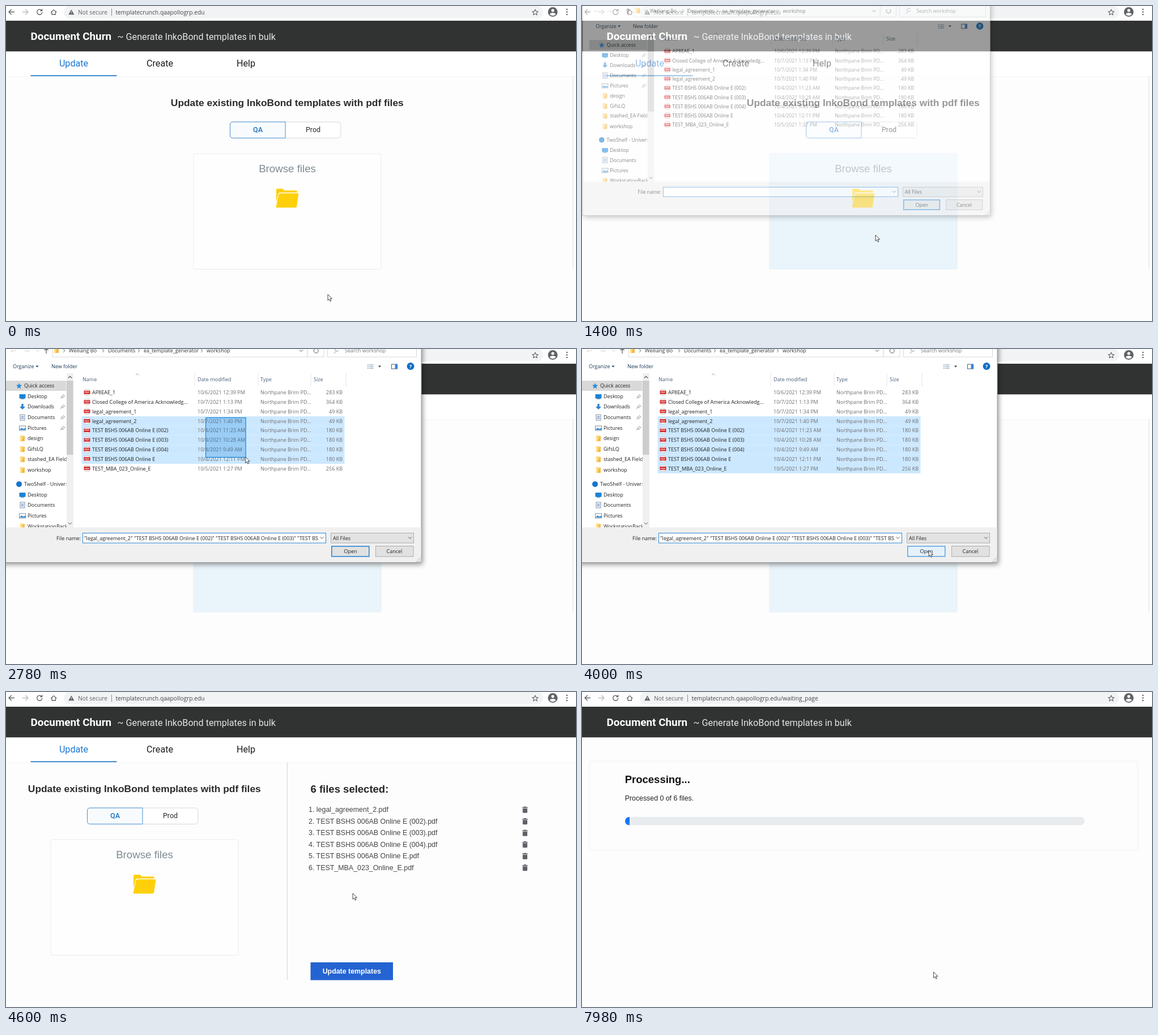
These frames come from a looping animation (1006 px wide and 557 px high, 8 s). An HTML page:

```html
<!DOCTYPE html>
<html lang="en">
<head>
<meta charset="utf-8">
<title>Template updater</title>
<style>
html, body { margin: 0; width: 100%; height: 100%; overflow: hidden; background: #fdfdfd; }
svg { display: block; width: 100%; height: 100%; }
text { white-space: pre; }
.ui { font-family: "Open Sans", "Noto Sans", sans-serif; }
.rob { font-family: Roboto, sans-serif; }
.ari { font-family: "Liberation Sans", Arial, sans-serif; }
.b { font-weight: 700; }
.mid { text-anchor: middle; }
.end { text-anchor: end; }
.line { fill: none; stroke-linecap: round; stroke-linejoin: round; }
</style>
</head>
<body>
<svg id="stage" viewBox="0 0 1006 557"></svg>
<script>
const LOOP = 8000, ROW = 16.8, ROW_TOP = 68.6, FIRST = 3;
const DRAG = [2440, 2980], SWITCH = 4220, STATUS = 6320, NAVIGATE = 6700;
const HOST = 'templatecrunch.qaapollogrp.edu';

const text = (x, y, s, size, fill, cls) =>
  `<text x="${x}" y="${y}" font-size="${size}" fill="${fill}" class="${cls}">${s}</text>`;
const ui = (x, y, s, fill = '#222', cls = '') => text(x, y, s, 9, fill, 'ui ' + cls);
const rect = (x, y, w, h, fill, more = '') =>
  `<rect x="${x}" y="${y}" width="${w}" height="${h}" fill="${fill}" ${more}/>`;
const path = (d, fill, more = '') => `<path d="${d}" fill="${fill}" ${more}/>`;
const line = (d, color, w = 1) => `<path class="line" d="${d}" stroke="${color}" stroke-width="${w}"/>`;
const chevron = (x, y, color = '#555') => line(`M${x - 2.8} ${y - 1.4}l2.8 2.8l2.8 -2.8`, color, 1);
const at = (x, y, body) => `<g transform="translate(${x} ${y})">${body}</g>`;

const files = [
  ['AP8EAE_1', '10/6/2021 12:39 PM', 283],
  ['Closed College of America Acknowledg...', '10/7/2021 1:13 PM', 364],
  ['legal_agreement_1', '10/7/2021 1:34 PM', 49],
  ['legal_agreement_2', '10/7/2021 1:40 PM', 49],
  ['TEST BSHS 006AB Online E (002)', '10/4/2021 11:23 AM', 180],
  ['TEST BSHS 006AB Online E (003)', '10/4/2021 10:28 AM', 180],
  ['TEST BSHS 006AB Online E (004)', '10/4/2021 9:49 AM', 180],
  ['TEST BSHS 006AB Online E', '10/4/2021 12:11 PM', 180],
  ['TEST_MBA_023_Online_E', '10/5/2021 1:27 PM', 256]
];

const icons = {
  star: path('M0-5l1.5 3.4 3.7.4-2.8 2.5.8 3.7L0 3.2l-3.2 1.8.8-3.7-2.8-2.5 3.7-.4z', '#2f8ddb'),
  desk: rect(-5.5, -4, 11, 7.5, '#1783d8') + rect(-3, 3.5, 6, 1, '#0b5fa5'),
  down: path('M-1.7-5h3.4v5h3.3L0 5l-5-5h3.3z', '#2b7fd0'),
  doc: rect(-4, -5, 8, 10, '#fff', 'stroke="#7b8ea3"') + line('M-2-2h4M-2 0h4M-2 2h4', '#4a86c5'),
  pic: rect(-5.5, -4, 11, 8, '#fff', 'stroke="#7b8ea3"') + path('M-5 3l3-4 3 2 4-1v3z', '#3d8fd1'),
  folder: path('M-4-5h6v10h-6z', '#ffd97a') + path('M2-4h2v9h-6z', '#f2b84b'),
  cloud: '<circle r="5" fill="#1474cc"/>'
};

const places = [
  [65, 'star', 'Quick access'], [84, 'desk', 'Desktop', 1], [102, 'down', 'Downloads', 1],
  [121, 'doc', 'Documents', 1], [140, 'pic', 'Pictures', 1], [158, 'folder', 'design'],
  [177, 'folder', 'GifsLQ'], [195, 'folder', 'stashed_EA Fields'], [214, 'folder', 'workshop'],
  [239, 'cloud', 'TwoShelf - University'], [258, 'desk', 'Desktop'], [276, 'doc', 'Documents'],
  [295, 'pic', 'Pictures'], [313.5, 'folder', 'WorkstationBackup']
];

const toolbar = () => {
  const c = '#5f6368';
  return rect(0, 0, 1006, 26, '#fff') + rect(102, 0, 846, 21.5, '#f1f3f4', 'rx="10.5"') +
    line('M14.5 10.5h-9.5m4.3-4.3l-4.3 4.3 4.3 4.3', c, 1.4) +
    line('M29.5 10.5h9.5m-4.3-4.3l4.3 4.3-4.3 4.3', '#b9bcc0', 1.3) +
    line('M63 8a4.6 4.6 0 1 0 .8 3.5M63.6 5.6v3h-3', c, 1.4) +
    line('M79.5 11l4.7-4.4 4.7 4.4M81 10.5v4.5h6.4v-4.5', c, 1.3) +
    path('M115.3 6.3l5 9h-10z', c) + line('M115.3 9.5v2.4M115.3 13.6v.1', '#f1f3f4', 1) +
    text(127, 15, 'Not secure', 10.3, c, 'ui') + line('M186.5 5v12', '#888') +
    `<text id="url" x="193.5" y="15" font-size="10.25" fill="#45494d" class="ui"></text>` +
    line('M934 6l1.5 3.4 3.6.4-2.7 2.4.8 3.6-3.2-1.9-3.2 1.9.8-3.6-2.7-2.4 3.6-.4z', c, 1.1) +
    `<circle cx="965" cy="10.5" r="8.5" fill="${c}"/><circle cx="965" cy="7.8" r="2.6" fill="#fff"/>` +
    path('M959.6 14.6q1-2.6 5.4-2.6t5.4 2.6q-2 2.6-5.4 2.6t-5.4-2.6z', '#fff') +
    [6, 10.5, 15].map(y => `<circle cx="990" cy="${y}" r="1.3" fill="${c}"/>`).join('');
};

const header = () => rect(0, 26, 1006, 54.5, '#313332') +
  text(43.5, 60, 'Document Churn', 18.9, '#fff', 'rob b') +
  text(196.5, 60, '~ Generate InkoBond templates in bulk', 16.2, '#e4e4e4', 'rob');

const tabs = () => rect(0, 80.5, 1006, 43.5, '#fff') + rect(0, 124, 1006, 1, '#f5f5f5') +
  [['Update', '#1976d2'], ['Create', '#1a1a1a'], ['Help', '#1a1a1a']]
    .map(([s, c], i) => text(119.5 + 152 * i, 107, s, 16.1, c, 'rob mid')).join('') +
  rect(43.5, 122.3, 152, 1.8, '#2a7fd0');

const picker = () => text(496.3, 176.5, 'Update existing InkoBond templates with pdf files', 17.36, '#2b2b2b', 'ari b mid') +
  rect(395.5, 205, 195.5, 28.5, '#fff', 'rx="5" stroke="#d4d6d8"') +
  path('M493 205h-92.5q-5 0-5 5v18.5q0 5 5 5h92.5z', '#f8fbfd', 'stroke="#4a90d0"') +
  text(444.5, 223.3, 'QA', 12.5, '#1f72c0', 'rob mid" font-weight="500') +
  text(542, 223.3, 'Prod', 12.5, '#2a2a2a', 'rob mid') +
  rect(331, 261, 331, 204.5, '#fefefe', 'rx="3" stroke="#ececec"') +
  rect(330, 260, 332.5, 206, '#eaf4fb', 'rx="3" id="tint"') +
  text(496.5, 293.8, 'Browse files', 18.7, '#7f8b92', 'ari mid') +
  path('M477 347v-22q0-2 2-2h8.500q1.800 0 2.500 1.500l.8 1.700h21q2 0 2 2v1.600h-30q-2.600 0-3.200 2.600z', '#ffd00a') +
  path('M484.500 331.300h30.500q1.600 0 1.300 1.600l-3.300 21.800q-.3 1.800-2 1.800h-33q-1.600 0-1.300-1.700l4.500-21q.6-2.500 3.300-2.500z', '#ffd00a');

const selected = () => rect(495.7, 124, 1.4, 385, '#dcdcdc') +
  text(537.5, 177.7, '6 files selected:', 18.5, '#262626', 'ari b') +
  files.slice(FIRST).map(([name], i) => {
    const y = 212 + 20.5 * i;
    return text(534, y, `${i + 1}. ${name}.pdf`, 12.43, '#444', 'ari') +
      at(911, y - 9.5, rect(0.3, 1, 9.4, 1.5, '#5f6167') + rect(3, 0, 4, 1.2, '#5f6167') +
        path('M.9 3.300h8.200v6.700q0 1.300-1.300 1.300h-5.600q-1.300 0-1.300-1.300z', '#5f6167'));
  }).join('') +
  rect(537.5, 478, 145.5, 31.5, '#2463d2') + rect(537.5, 478, 145.5, 31.5, '#1d58bd', 'id="press"') +
  text(610.3, 498, 'Update templates', 12.4, '#fff', 'ari b mid');

const progress = () => rect(0, 80.5, 1006, 477, '#fdfdfd') +
  rect(13, 122, 968, 157, '#fdfdfd', 'rx="5" stroke="#f9f9f9" stroke-width="4"') +
  text(75.7, 160.7, 'Processing...', 18.5, '#111', 'ari b') +
  text(75.7, 192, 'Processed 0 of 6 files.', 12.35, '#222', 'ari') +
  rect(76, 221, 811, 14.5, '#e9ecef', 'rx="7.2"') +
  '<path d="M84 221v14.500h-.8a7.200 7.250 0 0 1 0-14.500z" fill="#1677fb"/>' +
  '<path d="M84 221v14.500h-.8a7.200 7.250 0 0 1 0-14.500z" fill="url(#stripes)"/>';

const fileRow = ([name, date, size], i) => {
  const y = 80.2 + ROW * i;
  return rect(133.500, ROW_TOP + ROW * i, 464, ROW, '#cce8ff', 'class="hl"') +
    rect(139, y - 8.7, 8, 10.5, '#fff', 'rx="1" stroke="#c9a9a5" stroke-width=".7"') +
    rect(137.5, y - 6.5, 11, 6, '#d32121', 'rx="1"') + text(143, y - 2, 'PDF', 4.200, '#fff', 'ui b mid') +
    ui(152, y, name) + ui(338, y, date, '#6e6e6e') +
    ui(449, y, 'Northpane Brim PD...', '#6e6e6e') + ui(594, y, size + ' KB', '#6e6e6e', 'end');
};

const place = ([y, icon, label, pin]) => {
  const x = icon === 'star' || icon === 'cloud' ? 23 : 29;
  return at(x, y, icons[icon]) + ui(x + 9, y + 3.2, label) +
    (pin ? at(100, y, line('M-3.500 3.500l2.500-2.500M-2.500-.8l3.300 3.300M-1-.5l2.500-2.800 2.200 2.200-2.800 2.500', '#8a8f96', 1)) : '');
};

const dialog = () => {
  const crumb = [[111, 'Weiliang Bo'], [180, 'Documents'], [243, 'ea_template_generator'], [354, 'workshop']];
  return rect(-12, -30, 745, 407.500, '#fff', 'style="filter:drop-shadow(2px 3px 5px rgba(0,0,0,.45))"') +
    rect(-12, -30, 745, 407.500, '#fff', 'stroke="#9a9a9a"') +
    rect(82, -10, 450, 24, '#fff', 'stroke="#d9d9d9"') + rect(532, -10, 29, 24, '#fff', 'stroke="#d9d9d9"') +
    rect(567.500, -10, 157, 24, '#fff', 'stroke="#d9d9d9"') +
    line('M17 3h-8l3 3M33 3h8l-3 3', '#cfcfcf') + chevron(56, 3, '#cfcfcf') + line('M71 8v-9l-3 3M71-1l3 3', '#555', 1.2) +
    at(89, 2, icons.folder) + crumb.map(([x, s]) => ui(x, 6, s, '#333') + line(`M${x - 9.500} .5l2.300 2.500-2.300 2.500`, '#666')).join('') +
    chevron(521, 3) + line('M550 .2a4 4 0 1 1-5.500 0', '#555') +
    line('M587 2.500a3.200 3.200 0 1 1 .1-3M582 4.500l-3 3', '#7c93b5') + ui(598, 6, 'Search workshop', '#777') +
    ui(12, 34, 'Organize', '#1e395b') + path('M52.500 29.500h5l-2.500 3z', '#1e395b') + ui(80, 34, 'New folder', '#1e395b') +
    [28, 31, 34].map(y => line(`M638 ${y}h2M642 ${y}h6`, '#7b8da3', 1.2)).join('') + path('M657 29.500h5l-2.500 3z', '#333') +
    rect(680.500, 27, 10, 8, '#fff', 'stroke="#39608f"') + rect(686.500, 27, 4, 8, '#3d87cf') +
    '<circle cx="714" cy="30.500" r="6.500" fill="#0f6fc6"/>' + text(714, 34, '?', 9.500, '#fff', 'ui b mid') +
    `<g clip-path="url(#side)">${rect(0, 56, 107, 18, '#d9d9d9')}${places.map(place).join('')}</g>` +
    rect(107, 43, 12, 273, '#f0f0f0') + rect(107, 56, 11.500, 131, '#cdcdcd') +
    line('M110.200 51l2.800-2.800 2.800 2.800', '#555', 1.2) + chevron(113, 308.500) +
    [333, 445, 538, 600].map(x => rect(x - 0.5, 43, 1, 23, '#e6e6e6')).join('') + line('M229.500 46l2.500-2.500 2.500 2.500', '#999') +
    [[135, 'Name'], [338, 'Date modified'], [449, 'Type'], [543, 'Size']].map(([x, s]) => ui(x, 56.500, s, '#4c607a')).join('') +
    files.map(fileRow).join('') +
    '<rect id="marquee" fill="#0078d7" fill-opacity=".25" stroke="#0078d7"/>' +
    rect(-11, 315.500, 743.500, 61.500, '#f0f0f0') + ui(132, 337.500, 'File name:', '#222', 'end') +
    rect(135.500, 325.500, 429, 17.500, '#fff', 'stroke="#2b86d3"') + chevron(557.500, 334) +
    '<g clip-path="url(#field)"><text id="chosen" x="138" y="337.500" font-size="9" fill="#222" class="ui"></text></g>' +
    rect(573.500, 325.500, 146, 17.500, '#e3e3e3', 'stroke="#adadad"') + ui(577, 337.500, 'All Files') + chevron(713, 334) +
    rect(574.800, 348.800, 66, 18, '#e1e1e1', 'id="open" stroke="#2b86d3" stroke-width="1.600"') + ui(608, 361, 'Open', '#222', 'mid') +
    rect(652.500, 348.500, 66.500, 18.500, '#e1e1e1', 'stroke="#adadad"') + ui(685.500, 361, 'Cancel', '#222', 'mid') +
    [[730, 369], [730, 372], [730, 375], [727, 372], [727, 375], [724, 375]].map(([x, y]) => rect(x, y, 1.400, 1.400, '#a8a8a8')).join('');
};

const $ = id => document.getElementById(id);
$('stage').innerHTML = `<defs>
  <clipPath id="side"><rect y="43" width="106.500" height="272.500"/></clipPath>
  <clipPath id="field"><rect x="136" y="326" width="415" height="17"/></clipPath>
  <pattern id="stripes" width="14.500" height="14.500" patternUnits="userSpaceOnUse">
    <path d="M0 0h3.600l10.900 10.900v3.600h-3.600L0 3.600zM7.250 0" fill="none"/>
    <path d="M0 0h3.625L0 3.625zM14.500 3.625v7.250l-3.625 3.625H3.625z" fill="#fff" fill-opacity=".15"/>
  </pattern></defs>` +
  rect(0, 0, 1006, 557, '#fdfdfd') + toolbar() + header() +
  `<g id="main">${tabs()}<g id="left">${picker()}</g>` +
  rect(1000, 124, 1.2, 341.500, '#e4e4e4', 'id="edge"') + `<g id="list">${selected()}</g></g>` +
  `<g id="wait">${progress()}</g>` +
  `<g id="status">${rect(-2, 544, 196, 14, '#dee1e6')}${text(-3, 555.500, HOST + '/waiting_page', 8.800, '#5f6368', 'ui')}</g>` +
  `<g id="dialog">${dialog()}</g>` +
  `<g id="cursor"><path id="arrow" d="M0 0v10.500l2.400-2.200 1.700 3.900 1.800-.8-1.700-3.800h3.300z" fill="#fff" stroke="#333" stroke-width=".9"/>
   <path id="beam" class="line" d="M-2-5.500h1.500l.5.500.5-.5h1.500M0-5v10M-2 5.500h1.500l.5-.5.5.5h1.500" stroke="#333"/></g>`;

const clamp = v => Math.min(1, Math.max(0, v));
const span = (t, a, b) => clamp((t - a) / (b - a));
const smooth = k => k * k * (3 - 2 * k);
const easeOut = k => 1 - (1 - k) ** 2;

// start, end, target x, target y, easing, optional bend point
const moves = [
  [240, 780, 518, 405, smooth],
  [1620, 1760, 489, 332, k => k ** 1.4],
  [1760, 2420, 352, 121, easeOut],
  [...DRAG, 454, 222, smooth],
  [3140, 3940, 612, 356, smooth, [590, 290]],
  [5420, 6200, 620.5, 495, smooth]
];

function pointer(t) {
  let p = [568, 510];
  for (const [a, b, x, y, ease, bend] of moves) {
    const k = ease(span(t, a, b));
    const mid = bend || [(p[0] + x) / 2, (p[1] + y) / 2];
    p = [x, y].map((end, i) => (1 - k) ** 2 * p[i] + 2 * k * (1 - k) * mid[i] + k * k * end);
  }
  return p;
}

const set = (id, attrs) => { for (const k in attrs) $(id).setAttribute(k, attrs[k]); };
const show = (id, on) => { $(id).style.display = on ? '' : 'none'; };
const bars = [...document.querySelectorAll('.hl')];

function draw(t) {
  const [x, y] = pointer(t);
  const inside = (l, top, r, b) => x > l && x < r && y > top && y < b;
  const second = t >= SWITCH, waiting = t >= NAVIGATE;

  $('url').textContent = HOST + (waiting ? '/waiting_page' : '');
  show('main', !waiting);
  show('wait', waiting);
  show('list', second);
  show('edge', !second);
  show('status', t >= STATUS && t < NAVIGATE + 60);
  set('left', { transform: `translate(${second ? -252 : 0} 0)` });
  set('tint', { opacity: span(t, 490, 640) - span(t, SWITCH, SWITCH + 160) });
  set('press', { opacity: span(t, 5980, 6130) });

  const alpha = smooth(span(t, 1320, 1480)) - smooth(span(t, 4060, 4200));
  const scale = 0.93 + 0.07 * alpha;
  show('dialog', alpha > 0);
  set('dialog', { opacity: alpha, transform: `translate(366 174) scale(${scale}) translate(-366 -174)` });

  const limit = t < DRAG[0] ? 0 : t < DRAG[1] ? y : 222;
  const hovering = t > 1760 && t < DRAG[0] && x < 597;
  const chosen = [];
  bars.forEach((bar, i) => {
    const top = ROW_TOP + ROW * i;
    const on = i >= FIRST && top < limit;
    if (on) chosen.push(`"${files[i][0]}"`);
    bar.setAttribute('fill', on ? '#cce8ff' : hovering && y >= top && y < top + ROW ? '#e5f3ff' : 'none');
  });
  $('chosen').textContent = chosen.join(' ');
  show('marquee', t > DRAG[0] && t < DRAG[1] + 20);
  set('marquee', { x: 352.5, y: 121.5, width: Math.max(0, x - 352), height: Math.max(0, y - 121) });

  const over = inside(574, 348, 641, 367);
  set('open', { fill: over ? '#e5f1fb' : '#e1e1e1', 'stroke-width': over ? 1.1 : 1.6 });

  const typing = alpha > 0.5 && inside(135, 325, 552, 343);
  show('beam', typing);
  show('arrow', !typing);
  set('cursor', { transform: `translate(${x} ${y})` });
  set('stripes', { patternTransform: `translate(${76 - 14.5 * (t % 1000) / 1000} 221)` });
}

function tick() {
  draw(performance.now() % LOOP);
  requestAnimationFrame(tick);
}
tick();
</script>
</body>
</html>
```
